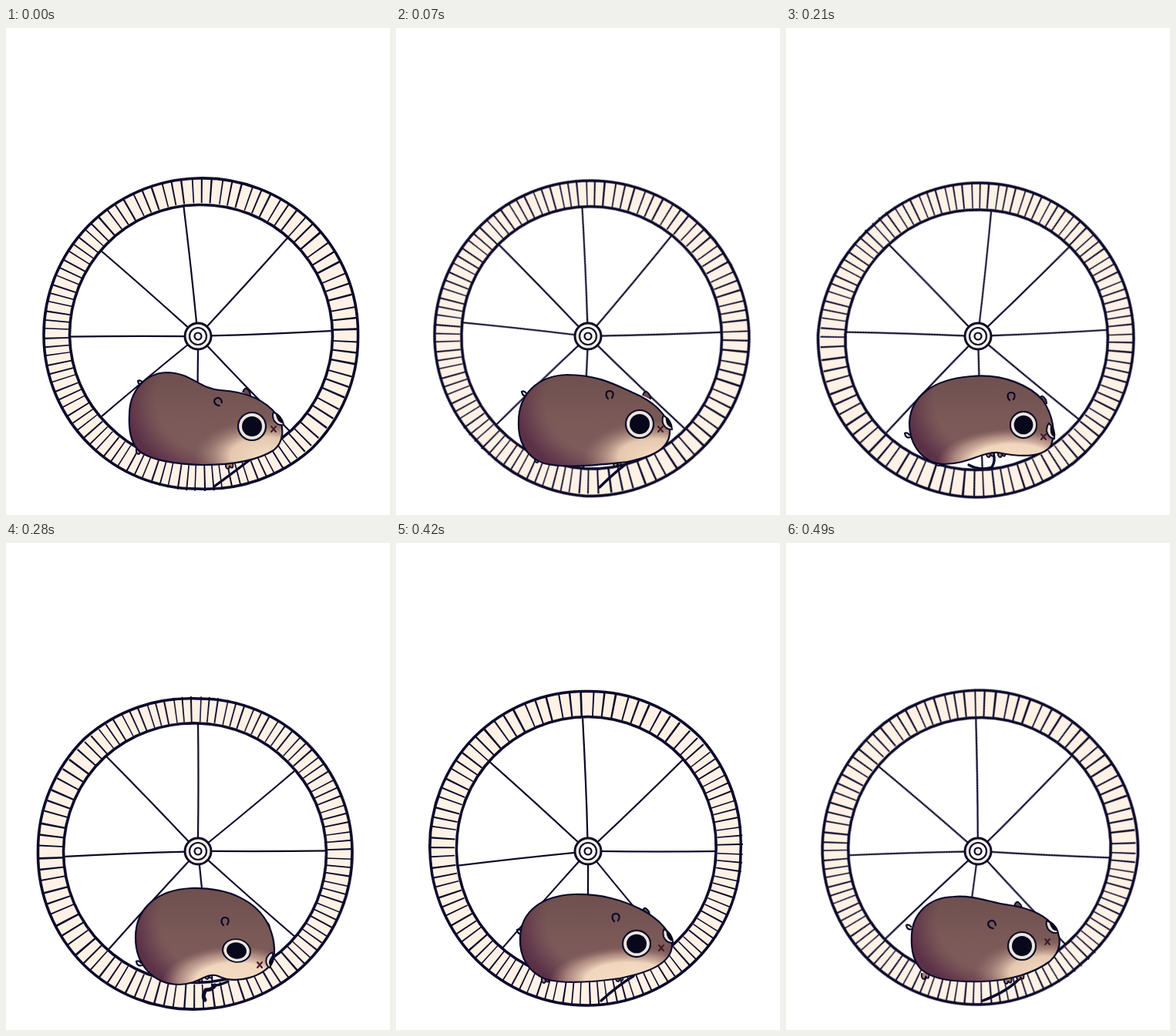
Recreate the animation shown at these times as an HTML page without scripts. Size 498 px wide and 632 px high, loop 560 ms.

```html
<!DOCTYPE html>
<html lang="en">
<head>
<meta charset="utf-8">
<title>Hamster wheel</title>
<style>
  html, body { margin: 0; width: 100%; height: 100%; overflow: hidden; background: #fff; }
  svg { display: block; width: 100vw; height: 100vh; }
  .ink { fill: none; stroke: #0c0a2a; stroke-width: 2.2; stroke-linecap: round; stroke-linejoin: round; }
  .rim { fill: #fef1e5; fill-rule: evenodd; stroke-width: 3.6; }
  .rungs { stroke-width: 33; stroke-linecap: butt; stroke-dasharray: .16 .8 .18 .95 .14 .77; }
  .leg { stroke-width: 3.4; }
  .paw { stroke-width: 5; }
  .wheel { animation: turn .56s step-end infinite; }
  .pose { visibility: hidden; animation: show .56s step-end infinite; animation-delay: calc((var(--i) - 8) * 70ms); }

  /* eight drawings per loop, about an eighth of a turn each */
  @keyframes turn {
    0% { transform: rotate(0deg); }
    12.5% { transform: rotate(46deg); }
    25% { transform: rotate(92deg); }
    37.5% { transform: rotate(135.8deg); }
    50% { transform: rotate(180deg); }
    62.5% { transform: rotate(223.7deg); }
    75% { transform: rotate(270deg); }
    87.5%, 100% { transform: rotate(316.8deg); }
  }
  @keyframes show {
    0% { visibility: visible; }
    12.5%, 100% { visibility: hidden; }
  }
</style>
</head>
<body>
<svg viewBox="0 0 498 632">
  <defs>
    <linearGradient id="fur" x1="0" y1="0" x2="0" y2="1">
      <stop offset="0" stop-color="#6f504f"/>
      <stop offset=".5" stop-color="#7a5957"/>
      <stop offset="1" stop-color="#7f5d5e"/>
    </linearGradient>
    <radialGradient id="shade" cx="0" cy="0" r="1" gradientTransform="translate(.6 .3) scale(.62 .85)">
      <stop offset=".68" stop-color="#673f4d" stop-opacity="0"/>
      <stop offset=".88" stop-color="#5d3048" stop-opacity=".6"/>
      <stop offset="1" stop-color="#532642" stop-opacity=".8"/>
    </radialGradient>
    <radialGradient id="belly" cx="0" cy="0" r="1" gradientTransform="translate(.72 .98) scale(.53 .38)">
      <stop offset="0" stop-color="#f5dec5"/>
      <stop offset=".55" stop-color="#f0d6bd"/>
      <stop offset=".8" stop-color="#cda797" stop-opacity=".6"/>
      <stop offset="1" stop-color="#a98078" stop-opacity="0"/>
    </radialGradient>
    <radialGradient id="chest" cx="0" cy="0" r="1" gradientTransform="translate(.9 .9) scale(.48 .4)">
      <stop offset="0" stop-color="#f5dec5"/>
      <stop offset=".5" stop-color="#eacdb3" stop-opacity=".95"/>
      <stop offset="1" stop-color="#a07a70" stop-opacity="0"/>
    </radialGradient>

    <path id="spoke" d="M0-16Q1-90 0-172"/>
    <g id="eye">
      <circle r="18" fill="#ece5da" stroke="#0c0a2a" stroke-width="2.2"/>
      <circle r="13" fill="#08071c"/>
    </g>
    <g id="far-eye">
      <path d="M-3-10Q6-2 4 10Q-4 9-6 0Q-6-7-3-10Z" fill="#ece5da" stroke="#0c0a2a" stroke-width="2"/>
      <path d="M-1-7Q5-1 4 8Q-3 5-1-7Z" fill="#08071c"/>
    </g>
    <path id="nose" d="M-3-3L3 4M3-3L-3 4" fill="none" stroke="#43192a" stroke-width="2" stroke-linecap="round"/>
    <path id="ear" class="ink" d="M-2 5C-6 1-5-5 0-5C5-5 6 0 3 4"/>
    <path id="far-ear" d="M-5 0Q-3-6 0-5Q5-2 5 5" fill="#6b4b4a" stroke="#0c0a2a" stroke-width="2"/>
    <path id="foot" d="M-5-4Q-6 4-2 4Q0 4 0 0Q2 4 4 2Q5 0 4-5" fill="#a77f73" stroke="#0c0a2a" stroke-width="1.8"/>
    <path id="tail" class="ink" d="M5 1Q-2 3-3-4Q0-6 3-2"/>

    <path id="b0" d="M160 502C160 472 180 448 208 447C240 447 250 468 278 470C312 472 336 482 352 503C362 518 360 538 347 548C325 562 290 567 255 567C215 566 190 561 174 550C161 539 159 520 160 502Z"/>
    <path id="b1" d="M159 511C159 476 183 451 222 450C263 450 286 464 309 474C332 484 352 500 355 522C356 545 335 556 300 563C260 567 220 572 192 565C168 557 158 535 159 511Z"/>
    <path id="b2" d="M158 522C158 482 186 454 236 453C286 452 322 464 340 483C352 500 357 525 352 541C340 560 305 562 262 561C235 562 215 569 192 567C170 563 157 545 158 522Z"/>
    <path id="b3" d="M160 512C162 478 190 456 240 452C285 448 318 466 333 483C346 502 350 525 344 541C335 556 310 558 275 551C253 550 236 566 205 566C178 565 160 542 160 512Z"/>
    <path id="b4" d="M168 512C168 475 195 450 240 448C290 447 325 465 340 495C348 512 350 530 346 543C335 562 300 574 275 562C260 556 250 573 225 573C192 573 168 548 168 512Z"/>
    <path id="b5" d="M160 515C162 475 195 455 245 453C290 452 325 465 343 484C356 500 362 525 360 540C350 556 315 562 285 564C260 566 232 573 205 573C180 572 160 548 160 515Z"/>
    <path id="b6" d="M161 512C162 478 189 458 230 456C268 455 294 464 317 475C340 487 358 505 358 522C357 545 330 557 290 565C255 570 220 573 194 566C172 557 160 538 161 512Z"/>
    <path id="b7" d="M163 509C164 482 184 460 217 459C245 457 262 466 290 470C318 474 338 484 350 500C358 515 356 530 342 543C322 558 290 568 255 569C218 570 192 567 176 554C165 543 162 526 163 509Z"/>
  </defs>

  <g transform="translate(249 400)">
    <g class="wheel">
      <g class="ink">
        <use href="#spoke" transform="rotate(-6.3)"/>
        <use href="#spoke" transform="rotate(42.3)"/>
        <use href="#spoke" transform="rotate(87.7)"/>
        <use href="#spoke" transform="rotate(136)"/>
        <use href="#spoke" transform="rotate(180)"/>
        <use href="#spoke" transform="rotate(230.2)"/>
        <use href="#spoke" transform="rotate(269.8)"/>
        <use href="#spoke" transform="rotate(311.4)"/>
      </g>
      <path class="ink rim" d="M207.5 0A203 203 0 0 1 146.7 146.7A206 206 0 0 1 0 198A199 199 0 0 1-140.7 140.7A200 200 0 0 1-200 0A202 202 0 0 1-142.8-142.8A206 206 0 0 1 0-205A204 204 0 0 1 147.8-147.8A204 204 0 0 1 207.5 0Z
        M174.5 0A170 170 0 0 1 121.6 121.6A172 172 0 0 1 0 166A166 166 0 0 1-116 116A167 167 0 0 1-166.5 0A169 169 0 0 1-119.1-119.1A171 171 0 0 1 0-170.5A170 170 0 0 1 122.7-122.7A171 171 0 0 1 174.5 0Z"/>
      <g class="ink rungs">
        <path pathLength="24" d="M-128.4-134.7A187 187 0 0 1 136-134.7"/>
        <path pathLength="21" d="M136-134.7A187 187 0 0 1 136 129.7"/>
        <path pathLength="27" d="M136 129.7A187 187 0 0 1-128.4 129.7"/>
        <path pathLength="27" d="M-128.4 129.7A187 187 0 0 1-128.4-134.7"/>
      </g>
    </g>
    <g class="ink">
      <circle r="17" fill="#fef1e5" stroke-width="3"/>
      <circle r="11" fill="#fff"/>
      <circle r="4.5" fill="#fef1e5"/>
    </g>
  </g>

  <g class="pose" style="--i:0">
    <use href="#tail" x="174" y="462"/>
    <use href="#foot" x="174" y="549"/>
    <use href="#far-ear" x="312" y="473"/>
    <path class="ink leg" d="M318 559Q300 573 270 595"/>
    <use href="#foot" x="290" y="568"/>
    <use href="#b0" fill="url(#fur)"/><use href="#b0" fill="url(#shade)"/><use href="#b0" fill="url(#chest)"/><use href="#b0" class="ink"/>
    <use href="#ear" transform="translate(275 485) rotate(-40)"/>
    <use href="#far-eye" transform="translate(353 507) rotate(-20)"/>
    <use href="#eye" x="319" y="517"/>
    <use href="#nose" x="347" y="520"/>
  </g>

  <g class="pose" style="--i:1">
    <use href="#tail" x="166" y="476"/>
    <use href="#foot" x="185" y="560"/>
    <use href="#far-ear" x="325" y="477"/>
    <path class="ink leg" d="M308 559Q288 572 264 596"/>
    <use href="#foot" x="287" y="565"/>
    <use href="#b1" fill="url(#fur)"/><use href="#b1" fill="url(#shade)"/><use href="#b1" fill="url(#chest)"/><use href="#b1" class="ink"/>
    <use href="#ear" x="277" y="476"/>
    <use href="#far-eye" transform="translate(352 512) rotate(-12)"/>
    <use href="#eye" x="316" y="514"/>
    <use href="#nose" x="343" y="520"/>
  </g>

  <g class="pose" style="--i:2">
    <use href="#tail" x="163" y="490"/>
    <use href="#foot" x="195" y="568"/>
    <use href="#far-ear" x="336" y="480"/>
    <path class="ink leg" d="M299 557Q283 567 271 579"/>
    <path d="M274 574Q258 579 254 594Q260 602 268 592Q269 582 274 574Z" fill="#0c0a2a"/>
    <use href="#foot" x="282" y="561"/>
    <use href="#foot" x="298" y="559"/>
    <use href="#b2" fill="url(#fur)"/><use href="#b2" fill="url(#shade)"/><use href="#b2" fill="url(#belly)"/><use href="#b2" class="ink"/>
    <use href="#ear" x="279" y="467"/>
    <use href="#far-eye" x="351" y="518"/>
    <use href="#eye" x="313" y="510"/>
    <use href="#nose" x="340" y="520"/>
  </g>

  <g class="pose" style="--i:3">
    <use href="#tail" x="157" y="530"/>
    <use href="#foot" x="200" y="564"/>
    <use href="#far-ear" x="333" y="483"/>
    <path class="ink leg" d="M237 567Q252 575 267 570Q272 562 269 552"/>
    <use href="#foot" x="265" y="553"/>
    <use href="#foot" x="280" y="553"/>
    <use href="#b3" fill="url(#fur)"/><use href="#b3" fill="url(#shade)"/><use href="#b3" fill="url(#belly)"/><use href="#b3" class="ink"/>
    <use href="#ear" x="292" y="478"/>
    <use href="#far-eye" x="344" y="523"/>
    <use href="#eye" transform="translate(308 515) scale(.95)"/>
    <use href="#nose" x="334" y="530"/>
  </g>

  <g class="pose" style="--i:4">
    <use href="#tail" x="172" y="547"/>
    <use href="#far-ear" x="337" y="496"/>
    <path class="ink leg" d="M288 569Q274 575 268 574"/>
    <path class="ink paw" d="M271 574Q268 580 259 580Q254 588 258 593"/>
    <use href="#foot" x="263" y="562"/>
    <use href="#foot" x="250" y="567"/>
    <use href="#b4" fill="url(#fur)"/><use href="#b4" fill="url(#shade)"/><use href="#b4" fill="url(#belly)"/><use href="#b4" class="ink"/>
    <use href="#ear" x="284" y="491"/>
    <use href="#far-eye" transform="translate(343 541) rotate(30) scale(.95)"/>
    <use href="#eye" transform="translate(299 529) rotate(10) scale(1 .82)"/>
    <use href="#nose" x="329" y="547"/>
  </g>

  <g class="pose" style="--i:5">
    <use href="#foot" x="208" y="573"/>
    <use href="#far-ear" x="345" y="489"/>
    <path class="ink leg" d="M312 563Q292 569 280 577"/>
    <path class="ink paw" d="M281 577Q275 585 279 593"/>
    <use href="#foot" x="293" y="562"/>
    <use href="#b5" fill="url(#fur)"/><use href="#b5" fill="url(#shade)"/><use href="#b5" fill="url(#belly)"/><use href="#b5" class="ink"/>
    <use href="#ear" transform="translate(302 478) rotate(-20)"/>
    <use href="#far-eye" x="359" y="523"/>
    <use href="#eye" transform="translate(319 516) scale(1.05 .9)"/>
    <use href="#nose" x="348" y="533"/>
  </g>

  <g class="pose" style="--i:6">
    <use href="#tail" x="160" y="506"/>
    <use href="#foot" x="194" y="567"/>
    <use href="#far-ear" x="324" y="479"/>
    <path class="ink leg" d="M308 562Q288 574 266 594"/>
    <use href="#foot" x="290" y="565"/>
    <use href="#b6" fill="url(#fur)"/><use href="#b6" fill="url(#shade)"/><use href="#b6" fill="url(#belly)"/><use href="#b6" class="ink"/>
    <use href="#ear" x="285" y="486"/>
    <use href="#far-eye" transform="translate(353 510) rotate(-14)"/>
    <use href="#eye" transform="translate(312 520) scale(1 .95)"/>
    <use href="#nose" x="344" y="525"/>
  </g>

  <g class="pose" style="--i:7">
    <use href="#tail" x="159" y="500"/>
    <use href="#foot" x="181" y="562"/>
    <use href="#far-ear" x="301" y="471"/>
    <path class="ink leg" d="M305 563Q288 582 255 594"/>
    <use href="#foot" x="288" y="568"/>
    <use href="#foot" x="304" y="563"/>
    <use href="#b7" fill="url(#fur)"/><use href="#b7" fill="url(#shade)"/><use href="#b7" fill="url(#chest)"/><use href="#b7" class="ink"/>
    <use href="#ear" transform="translate(267 495) rotate(-40)"/>
    <use href="#far-eye" transform="translate(345 498) rotate(-25)"/>
    <use href="#eye" x="306" y="523"/>
    <use href="#nose" x="339" y="517"/>
  </g>
</svg>
</body>
</html>
```
